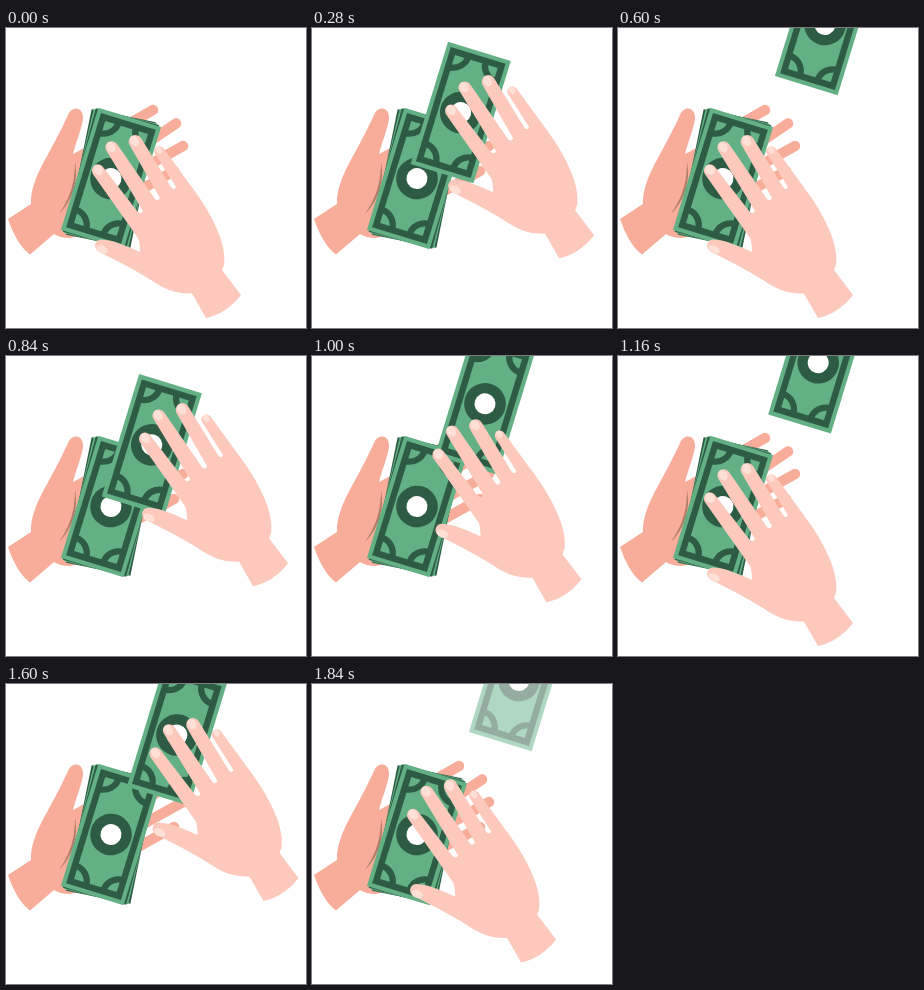
Recreate the animation shown at these times as an HTML page. Size 300x300 px, loop 1.88 s.

```html
<!DOCTYPE html>
<html lang="en">
<head>
<meta charset="utf-8">
<title>Counting cash</title>
<style>
  html, body { margin: 0; width: 100%; height: 100%; overflow: hidden; background: #fff; }
  svg { display: block; width: 100vw; height: 100vh; }
  .green { fill: #63b085; }
  .dark { fill: #2d5b43; }
  .line { fill: none; stroke: #2d5b43; stroke-width: 6.3; }
  .skin { fill: #fdc9bc; }
  .nail { fill: #fee0d7; }
  .shade { fill: #f8ac9a; }
  .finger { fill: none; stroke: #f8ac9a; stroke-width: 10.5; stroke-linecap: round; }
</style>
</head>
<body>
<svg viewBox="0 0 300 300">
  <defs>
    <rect id="paper" x="-32.8" y="-64" width="65.6" height="128"/>
    <g id="note">
      <use href="#paper" class="green"/>
      <rect class="line" x="-25.5" y="-56.5" width="51" height="113"/>
      <path class="line" d="M-9-56A16 16 0 0 1-25-40M9-56A16 16 0 0 0 25-40M-9 56A16 16 0 0 0-25 40M9 56A16 16 0 0 1 25 40"/>
      <circle class="dark" r="20.8"/>
      <circle r="10.5" fill="#fff"/>
    </g>
  </defs>

  <g id="holdingHand">
    <path class="finger" d="M112 102L147 82M125 126L170 95.500M132 143L177 118M132 163L168 143"/>
    <path class="shade" d="M2 191L25 176C24 150 44 127 62 87C66 77 78 79 77 91C75 103 70 114 67 126L82 118L110 200L64 210Q54 210 48 206L24 226.500Q11 217 2 191Z"/>
    <path d="M69 134C73 155 65 174 53 186C61 174 69 160 69 134Z" fill="#b07d68"/>
  </g>

  <g id="stack" transform="translate(105 150.500)">
    <use href="#paper" class="dark" transform="rotate(11.500)"/>
    <use href="#paper" class="green" transform="rotate(13.300)"/>
    <use href="#paper" class="dark" transform="rotate(15)"/>
    <use href="#note" transform="rotate(17)"/>
  </g>

  <g id="notes"></g>

  <g id="dealingHand">
    <path class="skin" d="M186 265.500C169 266 158 261 145 252C127 241 112 233 93 224C87 221 88 212 95 211.500C108 212 120 218 134 224Q134 215 132 210L108 176L86.500 145.500C84 138 92 133 97 139L131 183Q135 187 137 183L100 122C97 115 106 110 111 116L149 171Q152 174 154 170L123 116C121 107 131 104 135 110L165 159Q168 163 170 159L148.500 125C147 118 155 116 158 121L182 154C200 177 222 213 218 237L216 242L235 267Q220 286 200 290Z"/>
    <g class="nail">
      <ellipse rx="4.200" ry="5.500" transform="translate(92 142) rotate(-40)"/>
      <ellipse rx="4.200" ry="5.500" transform="translate(105 119) rotate(-32)"/>
      <ellipse rx="4.200" ry="5.500" transform="translate(128.500 113) rotate(-30)"/>
      <ellipse rx="3" ry="4" transform="translate(153 122) rotate(-35)"/>
      <ellipse rx="6" ry="3.800" transform="translate(96 221.500) rotate(24)"/>
    </g>
  </g>
</svg>
<script>
  const LOOP = 1880, STEP = 40, FADE = 80;
  const HOME = { x: 105, y: 150.5 };
  const FLIGHT = { x: 102, y: -154 };
  const REACH = { x: 57.5, y: -73 };

  const flights = [[40, 600], [600, 1200], [1235, 1800]];
  // rise start, top reached, descent start, back at rest
  const swings = [[40, 333, 333, 600], [600, 893, 893, 1160], [1190, 1483, 1627, 1880]];

  const dealingHand = document.getElementById('dealingHand');
  const layer = document.getElementById('notes');
  const notes = flights.map(() => {
    const note = document.createElementNS('http://www.w3.org/2000/svg', 'use');
    note.setAttribute('href', '#note');
    return layer.appendChild(note);
  });

  const progress = (t, from, to) => Math.min(1, Math.max(0, (t - from) / (to - from)));

  function render(t) {
    const lift = swings.reduce((sum, [start, top, leave, rest]) =>
      sum + progress(t, start, top) - progress(t, leave, rest), 0);
    dealingHand.setAttribute('transform', `translate(${REACH.x * lift} ${REACH.y * lift})`);

    flights.forEach(([start, end], i) => {
      const p = progress(t, start, end);
      const x = HOME.x + FLIGHT.x * p, y = HOME.y + FLIGHT.y * p;
      notes[i].setAttribute('transform', `translate(${x} ${y}) rotate(17)`);
      notes[i].setAttribute('opacity', t > start ? 1 - progress(t, end, end + FADE) : 0);
    });
  }

  const begin = performance.now();
  function tick() {
    const t = (performance.now() - begin) % LOOP;
    render(Math.floor(t / STEP) * STEP);
    requestAnimationFrame(tick);
  }
  tick();
</script>
</body>
</html>
```
